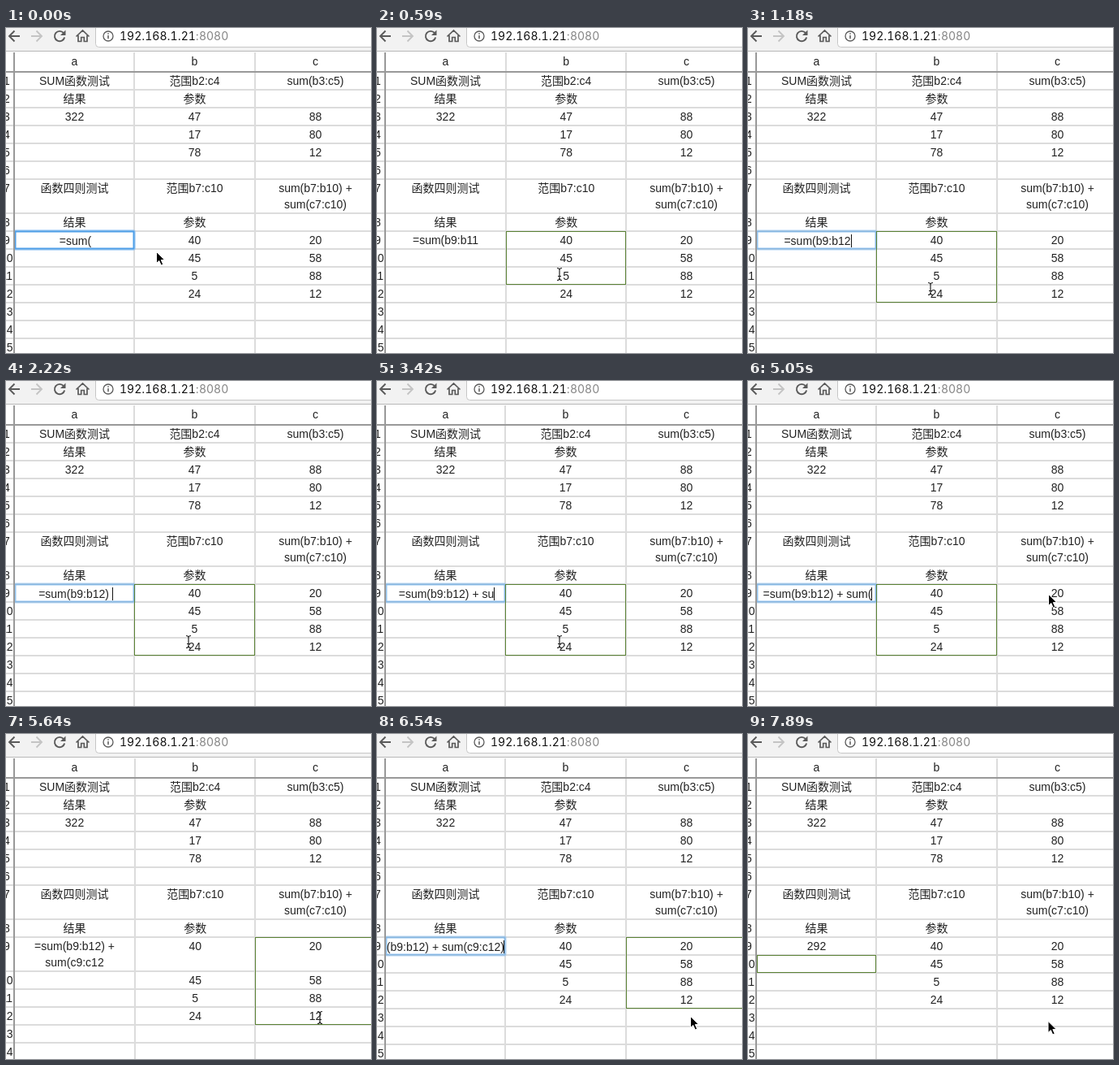
Animation, 450 px wide and 400 px high, one loop 8 s. Source, as an HTML page:

```html
<!DOCTYPE html>
<html lang="zh-CN">
<head>
<meta charset="utf-8">
<title>Spreadsheet formula</title>
<style>
  html, body { margin: 0; width: 100%; height: 100%; overflow: hidden; background: #fff; }
  svg { display: block; }
  text { font: 14px "Liberation Sans", "Noto Sans CJK SC", "Noto Sans CJK", sans-serif; fill: #222; white-space: pre; }
  .mid { text-anchor: middle; }
  .url, .url tspan { font-family: Inter, sans-serif; }
  .num { font-variant-numeric: tabular-nums; }
  .icon { fill: none; stroke: #5a5a5a; stroke-width: 1.9; }
</style>
</head>
<body>
<svg width="450" height="400" viewBox="0 0 450 400">
  <defs>
    <clipPath id="field"><rect x="12" y="252" width="145.5" height="20"/></clipPath>
    <clipPath id="pane"><rect x="11" y="30" width="439" height="370"/></clipPath>
  </defs>
  <g id="sheet"></g>
  <g id="bar">
    <rect width="450" height="29" fill="#f2f2f2"/>
    <rect y="28" width="450" height="1" fill="#b8b8b8"/>
    <rect x="110.5" y="-8" width="360" height="31.5" rx="4" fill="#fff" stroke="#c6c6c6"/>
    <path class="icon" d="M17 10H4.5M10.5 3.5L4 10l6.500 6.500"/>
    <path class="icon" style="stroke:#c4c4c4" d="M31 10h12.500M37.500 3.500L44 10l-6.500 6.500"/>
    <path class="icon" d="M71 6.200A6.200 6.200 0 1 0 72.200 11.500"/>
    <path d="M73.500 2.500v6.500h-6.500z" fill="#5a5a5a"/>
    <path class="icon" style="stroke-width:1.700" d="M86.500 10.500L94.500 3l8 7.500M89 9v7.500h3.700v-5h3.600v5h3.700V9"/>
    <circle class="icon" style="stroke-width:1.300" cx="126" cy="10" r="6"/>
    <path class="icon" style="stroke-width:1.500" d="M126 9v4.300M126 6.300v1.500"/>
    <text class="url" x="140" y="15" id="url"></text>
  </g>
  <g id="cursor"></g>
</svg>
<script>
const LOOP = 8000;
const $ = id => document.getElementById(id);

// Cell contents by row; an array inside a cell holds wrapped lines.
const ROWS = [
  ['SUM函数测试', '范围b2:c4', 'sum(b3:c5)'],
  ['结果', '参数', ''],
  ['322', '47', '88'],
  ['', '17', '80'],
  ['', '78', '12'],
  ['', '', ''],
  ['函数四则测试', '范围b7:c10', ['sum(b7:b10) +', 'sum(c7:c10)']],
  ['结果', '参数', ''],
  ['', '40', '20'],
  ['', '45', '58'],
  ['', '5', '88'],
  ['', '24', '12'],
  ['', '', ''], ['', '', ''], ['', '', '']
];

const A = '=sum(b9:b12', B = A + ') + sum(', C = ['=sum(b9:b12) +'];
const wrap = tail => [...C, 'sum(' + tail];

// Each step changes only the listed parts of the state.
const STEPS = [
  [0, { edit: true, text: '=sum(', caret: false, ring: 1, sel: null, ptr: ['arrow', 185, 275] }],
  [140, { ptr: ['arrow', 206, 268] }],
  [290, { edit: false, text: '=sum(b9', sel: [1, 9, 9], ptr: ['beam', 225, 264] }],
  [440, { text: '=sum(b9:b10', sel: [1, 9, 10], ptr: ['beam', 225, 283] }],
  [590, { text: '=sum(b9:b11', sel: [1, 9, 11], ptr: ['beam', 225, 303] }],
  [730, { text: A, sel: [1, 9, 12], ptr: ['beam', 225, 317] }],
  [880, { ptr: ['beam', 225, 321] }],
  [1180, { edit: true, caret: true, ring: .6 }],
  [1630, { caret: false }],
  [1770, { text: A + ')', caret: true }],
  [2220, { text: A + ') ' }],
  [2670, { caret: false }],
  [2820, { text: A + ') +', caret: true }],
  [3120, { text: A + ') + ' }],
  [3420, { text: A + ') + su' }],
  [3720, { text: A + ') + sum' }],
  [4010, { text: B }],
  [4460, { caret: false }],
  [4610, { ptr: ['arrow', 262, 308] }],
  [4760, { ptr: ['arrow', 334, 279] }],
  [4910, { caret: true, ptr: ['arrow', 370, 262] }],
  [5060, { edit: false, text: wrap('c9'), sel: [2, 9, 9], ptr: ['beam', 385, 266] }],
  [5200, { text: wrap('c9:c10'), sel: [2, 9, 10], ptr: ['beam', 386, 302] }],
  [5350, { text: wrap('c9:c11'), sel: [2, 9, 11], ptr: ['beam', 387, 326] }],
  [5500, { text: wrap('c9:c12'), sel: [2, 9, 12], ptr: ['beam', 387, 341] }],
  [5640, { ptr: ['beam', 387, 349] }],
  [5940, { edit: true, text: B + 'c9:c12', ptr: ['arrow', 386, 347] }],
  [6540, { text: B + 'c9:c12)' }],
  [6990, { caret: false }],
  [7290, { edit: false, text: '292', sel: [0, 10, 10] }],
  [7890, { ptr: ['arrow', 369.5, 353] }]
];

const states = [];
STEPS.forEach(([, change], i) => states.push({ ...states[i - 1], ...change }));

const rect = (x, y, w, h, fill) => `<rect x="${x}" y="${y}" width="${w}" height="${h}" fill="${fill}"/>`;
const frame = (x, y, w, h, color, line, more = '') =>
  `<rect x="${x}" y="${y}" width="${w}" height="${h}" fill="none" stroke="${color}" stroke-width="${line}" ${more}/>`;
const label = (x, y, s) => `<text class="mid" x="${x}" y="${y + 5}">${s}</text>`;

function drawSheet(s) {
  const formula = [s.text].flat();
  const shift = !s.edit && formula[0][0] === '=' ? 1 : 0;
  const mids = [84.5, 232.5 + shift * .7, 381.5];
  const edges = [10, 158 + shift, 307, 456];
  const tops = [];
  let out = rect(0, 29, 450, 371, '#fff');
  let words = 'abc'.split('').map((c, i) => label(mids[i], 41, c)).join('');
  let y = 54;

  ROWS.forEach((row, r) => {
    const cells = r === 8 ? [s.edit ? '' : formula, row[1], row[2]] : row;
    const lines = cells.map(c => [c].flat());
    tops.push(y);
    words += label(.8, y + 11, r + 1);
    lines.forEach((ls, c) => ls.forEach((t, k) => {
      if (t) words += label(mids[c], y + 11 + 20 * k, t);
    }));
    y += 2 + 20 * Math.max(...lines.map(ls => ls.length));
    out += rect(0, y - 1, 450, 2, '#dcdcdc');
  });
  tops.push(y);

  out += rect(edges[1] - 1, 30, 2, 370, '#dcdcdc') + rect(edges[2] - 1, 30, 2, 370, '#dcdcdc');
  out += rect(0, 53, 450, 2, '#999') + rect(9, 30, 2, 370, '#999') + words;

  if (s.edit) {
    out += `<g clip-path="url(#pane)" opacity="${s.ring}">` + rect(11, 250, 147, 22, '#fff') +
      frame(10.5, 249.5, 148, 23, '#8fc3f5', 3, 'rx="2" opacity=".6"') +
      frame(11.5, 250.5, 146, 21, '#4f9fe8', 2) + '</g>' +
      '<g clip-path="url(#field)"><text id="entry" y="267"></text></g>';
  }
  if (s.sel) {
    const [c, first, last] = s.sel;
    const x = c ? edges[c] : 11, top = tops[first - 1];
    out += frame(x + .5, top + .5, edges[c + 1] - x - 1, tops[last] - top - 1, '#5b8235', 1);
  }
  $('sheet').innerHTML = out;

  if (s.edit) {
    const entry = $('entry');
    entry.textContent = s.text;
    const w = entry.getComputedTextLength();
    const left = w > 145 ? 157 - w : 85.5 - w / 2;
    entry.setAttribute('x', left);
    if (s.caret) $('sheet').insertAdjacentHTML('beforeend', rect(Math.min(156, Math.round(left + w)), 254, 1, 16, '#111'));
  }
}

const SHAPES = {
  arrow: '<path d="M.5 .5V14.500L3.800 11.500L6.200 17L8.700 15.900L6.300 10.600H10.700Z" fill="#000" stroke="#fff"/>',
  beam: '<path d="M-3 -7.500Q0 -7.500 0 -5V5Q0 7.500 -3 7.500M3 -7.500Q0 -7.500 0 -5M0 5Q0 7.500 3 7.500M-2 2.500H2" fill="none" stroke="#222" stroke-width="1.200"/>'
};

function drawCursor([kind, x, y]) {
  $('cursor').innerHTML = `<g transform="translate(${x} ${y})">${SHAPES[kind]}</g>`;
}

const digits = (s, color) => s.split(/(\d+)/).filter(Boolean)
  .map(p => `<tspan fill="${color}"${/\d/.test(p) ? ' class="num"' : ''}>${p}</tspan>`).join('');
$('url').innerHTML = digits('192.168.1.21', '#111') + digits(':8080', '#858585');

let shown = -1;
function tick() {
  const t = performance.now() % LOOP;
  const i = STEPS.findLastIndex(([at]) => at <= t);
  if (i !== shown) {
    shown = i;
    drawSheet(states[i]);
    drawCursor(states[i].ptr);
  }
  requestAnimationFrame(tick);
}
tick();
</script>
</body>
</html>
```
